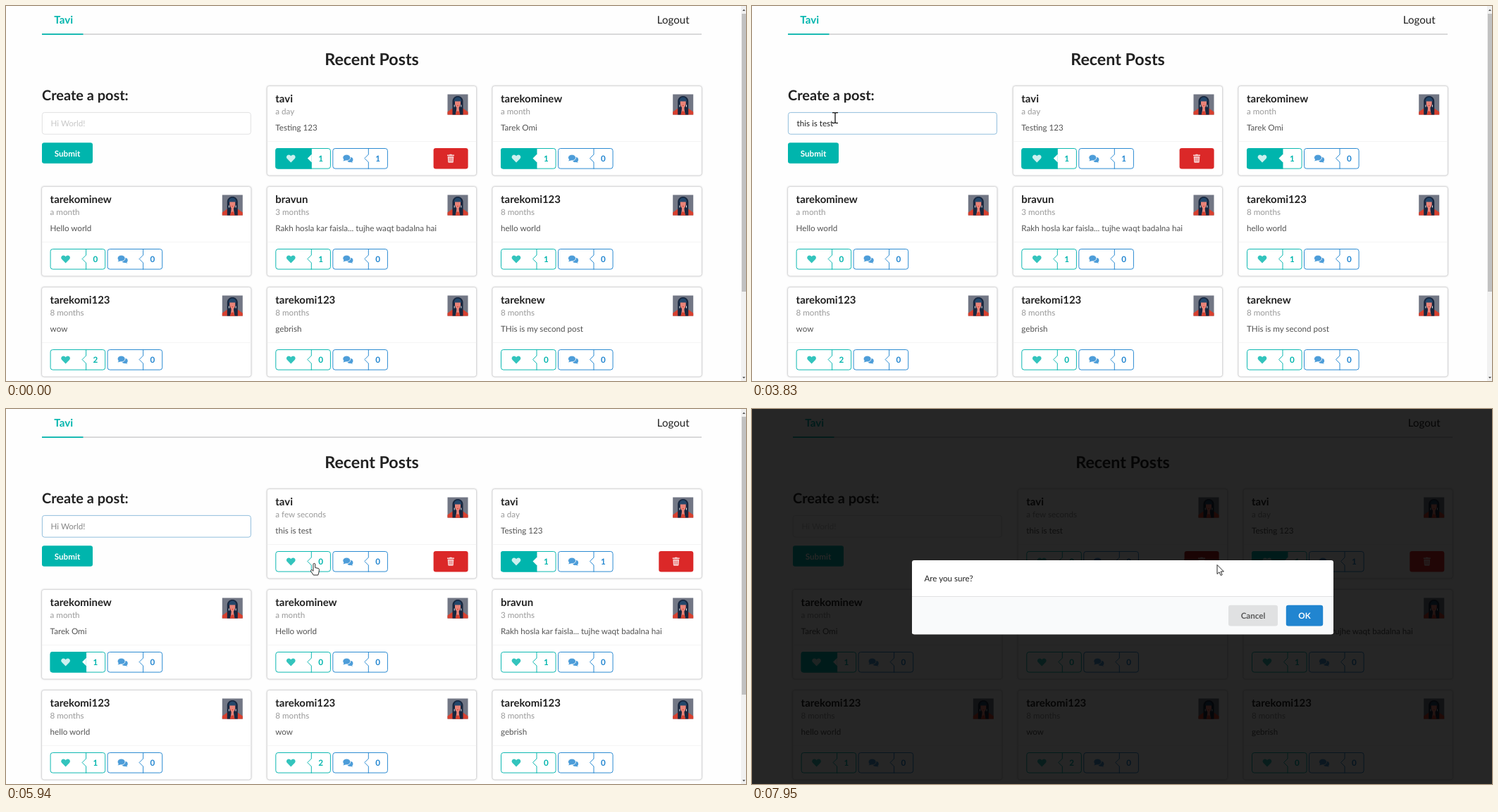
Write an HTML page that moves like this. It is 1050 px wide and 533 px high and loops after 8 s.

```html
<!DOCTYPE html>
<html lang="en">
<head>
<meta charset="utf-8">
<title>Recent Posts</title>
<style>
html, body { margin: 0; width: 100%; height: 100%; overflow: hidden; background: #fefefe; }
svg { display: block; width: 100vw; height: 100vh; }
text { font: 11.63px Lato, sans-serif; fill: rgba(0,0,0,.87); white-space: pre; text-rendering: geometricPrecision; }
.b { font-weight: 700; }
.mid { text-anchor: middle; }
.name { font-size: 14.95px; font-weight: 700; }
.menu { font-size: 15.1px; }
.date { fill: rgba(0,0,0,.4); }
.desc { fill: rgba(0,0,0,.68); }
.w { fill: #fff; }
.hint { font-size: 10.75px; fill: #333; }
.card { fill: #fff; stroke: #d4d4d5; stroke-width: .9; filter: drop-shadow(0 .8px 1.2px #d4d4d5); }
.pop { fill: #fff; filter: drop-shadow(0 1px 2px rgba(0,0,0,.35)); }
</style>
</head>
<body>
<svg viewBox="0 0 1050 533" preserveAspectRatio="none">
  <defs>
    <path id="heart" d="M0 5.7-5.4.2C-8-2.6-4.8-6.8-1.2-4.7L0-3.5 1.2-4.7C4.8-6.8 8-2.6 5.4.2Z"/>
    <g id="chat">
      <path d="M5 4Q6 5.5 7.3 5.7 5 6 3 4.8Z"/>
      <ellipse cx="3" cy="1.6" rx="4.1" ry="3.6"/>
      <ellipse cx="-2" cy="-1.3" rx="5.5" ry="4.4" stroke="#fff" stroke-width=".9"/>
      <path d="M-5.5.5Q-6 2.8-7.2 3.4-4.5 3.8-2 2Z"/>
    </g>
    <g id="trash">
      <path d="M-5-5.2H-2L-1.4-6.1H1.4L2-5.2H5V-3.8H-5ZM-4.3-3.1H4.3L3.8 5Q3.7 6 2.7 6H-2.7Q-3.7 6-3.8 5Z"/>
      <path d="M-2-1.5V4.3M0-1.5V4.3M2-1.5V4.3" stroke="#db2828" stroke-width=".6"/>
    </g>
    <g id="avatar">
      <path fill="#727785" d="M0 0H29V29H0Z"/>
      <path fill="#d8402f" d="M0 29V25L7 20H22L29 25V29Z"/>
      <path fill="#18273f" d="M7 29V10C7 0 22 0 22 10V29Z"/>
      <path fill="#e98479" d="M10.5 9H18.5V14Q17.5 18 16.3 18.6V21L17.5 29H11.5L12.7 21V18.6Q11.5 18 10.5 14Z"/>
      <path fill="#24476a" d="M9 10Q10 4 14.5 4T20 10Z"/>
      <path fill="#d8402f" d="M13 15.5H16L14.5 16.7ZM11 29 13 24H16L18 29Z"/>
      <path stroke="#eee" d="M9.7 15V18M19.3 15V18"/>
    </g>
  </defs>
  <g id="page">
    <text class="menu b" x="68.3" y="25" fill="#00b5ad" style="fill:#00b5ad">Tavi</text>
    <text class="menu" x="969.7" y="25" text-anchor="end">Logout</text>
    <path d="M51 40.2H987" stroke="#d4d4d5" stroke-width="1.7"/>
    <path d="M51 40.2H109.5" stroke="#00b5ad" stroke-width="1.7"/>
    <text class="b mid" x="519" y="84" style="font-size:23.25px">Recent Posts</text>
    <text class="b" x="51" y="134" style="font-size:19.93px">Create a post:</text>
    <rect id="field" x="51.4" y="151.4" width="296" height="30.8" rx="3.3" fill="#fff" stroke-width=".9"/>
    <text id="typed" x="63.5" y="171"></text>
    <path id="caret" d="M0 160V174" stroke="#222"/>
    <rect x="51" y="194.3" width="72" height="29.5" rx="3.3" fill="#00b5ad"/>
    <text class="b mid w" x="87" y="213.5">Submit</text>
    <g id="before"></g>
    <g id="after"></g>
    <g id="fresh"></g>
  </g>
  <g id="bar">
    <path fill="#f1f1f1" d="M1043 0H1050V533H1043Z"/>
    <path fill="#c1c1c1" d="M1044 11H1050V406H1044Z"/>
    <path fill="#555" d="M1045 7 1047 4.5 1049 7ZM1045 527 1047 529.5 1049 527Z"/>
  </g>
  <g id="hints"></g>
  <g id="tip">
    <rect x="607" y="157.5" width="82" height="36" rx="3.3" fill="#1b1c1d"/>
    <path d="M618.5 193 623 198 627.5 193Z" fill="#1b1c1d"/>
    <text class="w" x="618.5" y="179.5">Delete post</text>
  </g>
  <g id="modal">
    <rect width="1050" height="533" fill="rgba(0,0,0,.85)"/>
    <rect x="227" y="215" width="598" height="105.3" rx="3.3" fill="#fff"/>
    <path d="M227 266.5H825V317Q825 320.3 821.7 320.3H230.3Q227 320.3 227 317Z" fill="#f9fafb"/>
    <path d="M227 266.5H825" stroke="#dededf" stroke-width=".9"/>
    <text x="244.5" y="245.3">Are you sure?</text>
    <rect x="676" y="278.8" width="70" height="29.7" rx="3.3" fill="#e0e1e2"/>
    <text class="b mid" x="711" y="298" style="fill:rgba(0,0,0,.6)">Cancel</text>
    <rect x="757.8" y="278.8" width="52.4" height="29.7" rx="3.3" fill="#2185d0"/>
    <text class="b mid w" x="784" y="298">OK</text>
  </g>
  <g id="mouse">
    <circle id="click" r="10" fill="#e8b010" opacity=".88"/>
    <path id="cursor" stroke-linejoin="round"/>
  </g>
</svg>
<script>
const $ = id => document.getElementById(id);
const TEAL = '#00b5ad', BLUE = '#2185d0';
const QUOTE = 'Rakh hosla kar faisla... tujhe waqt badalna hai';

// author, age, text, likes, comments, liked, own
const posts = [
  ['tavi', 'a day', 'Testing 123', 1, 1, true, true],
  ['tarekominew', 'a month', 'Tarek Omi', 1, 0, true],
  ['tarekominew', 'a month', 'Hello world', 0, 0],
  ['bravun', '3 months', QUOTE, 1, 0],
  ['tarekomi123', '8 months', 'hello world', 1, 0],
  ['tarekomi123', '8 months', 'wow', 2, 0],
  ['tarekomi123', '8 months', 'gebrish', 0, 0],
  ['tareknew', '8 months', 'THis is my second post', 0, 0]
];
const newPost = ['tavi', 'a few seconds', 'this is test', 0, 0, false, true];

function pill(x, color, icon, count, filled) {
  return `<g transform="translate(${x} 88)" stroke-width=".95">
    <rect x=".5" y=".5" width="77.6" height="28.6" rx="3.3" fill="#fff" stroke="${color}"/>
    ${filled ? `<path d="M51 0V29.6H3.3Q0 29.6 0 26.3V3.3Q0 0 3.3 0Z" fill="${color}"/>` : ''}
    <path d="M51 0V9M51 20V29.6" stroke="${color}"/>
    <path d="M51 9 45.5 14.5 51 20" fill="#fff" stroke="${filled ? 'none' : color}"/>
    <use href="#${icon}" x="22" y="14.8" fill="${filled ? '#fff' : color}" opacity=".8"/>
    <text class="b mid" x="64.3" y="19" style="fill:${color}">${count}</text></g>`;
}

function card([name, age, text, likes, comments, liked, own], slot) {
  const x = 51 + 319.7 * (slot % 3), y = 114 + 143 * Math.floor(slot / 3);
  return `<g transform="translate(${x} ${y})">
    <rect class="card" x="-.4" y="-.4" width="297.3" height="127.3" rx="3.3"/>
    <use href="#avatar" x="255.8" y="11.5"/>
    <text class="name" x="11.6" y="23">${name}</text>
    <text class="date" x="11.6" y="40">${age}</text>
    <text class="desc" x="11.6" y="63">${text}</text>
    <path d="M0 78.5H296.5" stroke="#f3f3f3" stroke-width=".9"/>
    ${pill(11.6, TEAL, 'heart', likes, liked)}${pill(92.6, BLUE, 'chat', comments)}
    ${own ? `<rect class="bin" x="235.9" y="88" width="49" height="29.6" rx="3.3" fill="#db2828"/>
      <use href="#trash" x="260.3" y="102.8" fill="#fff" opacity=".8"/>` : ''}</g>`;
}

function hintBox(items, width) {
  const h = 16 + 21 * items.length;
  return `<rect class="pop" x="132.5" y="189.8" width="${width}" height="${h}" rx="4"/>
    <path d="M146 190.3 152 184.3 158 190.3Z" fill="#fff" stroke="#e4e4e4" stroke-width=".6"/>
    <path d="M146.5 190.6H157.5" stroke="#fff" stroke-width="1.2"/>` +
    items.map((s, i) => `<text class="hint" x="142.5" y="${212.6 + 21 * i}">${s}</text>`).join('');
}

$('before').innerHTML = posts.map((p, i) => card(p, i + 1)).join('');
$('after').innerHTML = posts.slice(0, 7).map((p, i) => card(p, i + 2)).join('');
$('fresh').innerHTML = card(newPost, 1);
$('hints').innerHTML = `<g id="many">${hintBox(['Testing 123', QUOTE, 'Hello world', 'Tarek Omi'], 253)}</g>
  <g id="one">${hintBox(['Testing 123'], 91.5)}</g>`;
const bin = document.querySelector('#fresh .bin');

const cursors = {
  arrow: ['M0 0V13L3 10.3 5.2 15 7.2 14.1 5.1 9.5H9.4Z', '#fff', .9],
  hand: ['M-1.5 10V1.3A1.4 1.4 0 0 1 1.3 1.3V6L5.5 6.9Q7 7.3 7 9.1L6.3 13.5 5.3 16.5H-1.2L-4.8 11.2Q-5.5 9.6-4.3 9.1-3.2 8.8-1.5 10.8Z', '#fff', .9],
  beam: ['M-4-7.3H-1L0-6.6 1-7.3H4M0-6.6V6.6M-4 7.3H-1L0 6.6 1 7.3H4', 'none', 1.3]
};

const path = [
  [590, 316, 345], [660, 295, 319], [800, 295, 319], [1000, 210, 232], [1190, 114, 147],
  [1260, 118, 159], [5000, 118, 159], [5490, 290, 190], [5940, 437, 219.5], [6130, 525, 228],
  [6330, 615, 217], [6740, 621.5, 208], [7949, 621.5, 208], [7950, 660, 221.5], [8000, 660, 221.5]
];
const keyTimes = [1990, 2120, 2200, 2280, 2350, 2430, 2520, 2650, 2850, 2970, 3110, 3310];

function pointer(t) {
  const i = Math.max(1, path.findIndex(p => p[0] > t));
  const [t0, x0, y0] = path[i - 1], [t1, x1, y1] = path[i];
  const k = Math.max(0, (t - t0) / (t1 - t0));
  return [x0 + (x1 - x0) * k, y0 + (y1 - y0) * k];
}

function cursorKind(x, y, t) {
  if (t >= 7220) return 'arrow';
  if (x < 348 && y < 242) return y > 151 && y < 182 ? 'beam' : 'arrow';
  const col = (x - 51) % 319.7, row = (y - 114) % 143;
  if (col > 296.5 || row > 127) return 'arrow';
  const onButton = row > 88 && row < 118 && (col > 11 && col < 171 || col > 235 && col < 285);
  return row < 78.5 || onButton ? 'hand' : 'arrow';
}

const show = (id, on) => { $(id).style.display = on ? '' : 'none'; };
const within = (t, a, b) => t >= a && t < b;

function draw(t) {
  const focused = within(t, 1450, 7220), posted = t >= 4690, asking = t >= 7420;

  const value = posted ? '' : newPost[2].slice(0, keyTimes.filter(k => t >= k).length);
  const typed = $('typed');
  typed.textContent = value || 'Hi World!';
  typed.style.fill = value ? 'rgba(0,0,0,.87)' : focused ? 'rgba(115,115,115,.87)' : 'rgba(191,191,191,.87)';
  $('field').setAttribute('stroke', focused ? '#85b7d9' : '#dededf');
  const blink = t < 3305 || Math.floor((t - 3305) / 525) % 2 === 0;
  show('caret', focused && blink);
  $('caret').setAttribute('transform', `translate(${64 + (value ? typed.getComputedTextLength() : 0)} 0)`);

  show('before', !posted);
  show('after', posted);
  show('fresh', posted);
  const fade = Math.min(1, Math.max(0, (t - 4650) / 500));
  $('fresh').setAttribute('opacity', fade * fade * (3 - 2 * fade));
  bin.setAttribute('fill', t < 6330 ? '#db2828' : t < 7220 ? '#d01919' : '#b21e1e');

  show('many', within(t, 1520, 2060));
  show('one', within(t, 2060, 2120));
  show('tip', within(t, 6330, 7420));
  show('modal', asking);
  show('bar', !asking);
  $('page').setAttribute('transform', `translate(${asking ? 7 : 0} 0)`);

  const [x, y] = pointer(t), [d, fill, width] = cursors[cursorKind(x, y, t)];
  show('mouse', t >= 590);
  show('click', within(t, 1450, 1590) || within(t, 7220, 7420));
  $('mouse').setAttribute('transform', `translate(${x} ${y})`);
  const cursor = $('cursor');
  cursor.setAttribute('d', d);
  cursor.setAttribute('fill', fill);
  cursor.setAttribute('stroke', '#111');
  cursor.setAttribute('stroke-width', width);
}

const start = performance.now();
function tick() {
  draw((performance.now() - start) % 8000);
  requestAnimationFrame(tick);
}
tick();
</script>
</body>
</html>
```
